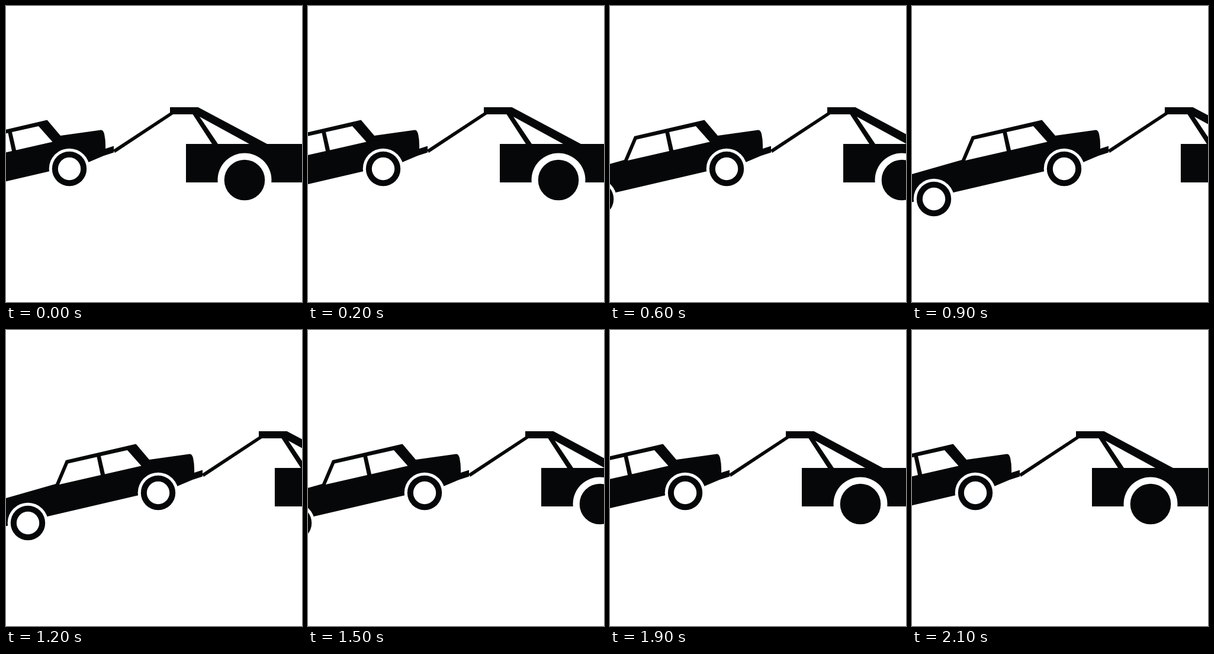
An HTML page for the animation above (2.2 s loop, 500 by 500 pixels).

```html
<!DOCTYPE html>
<html lang="en">
<head>
<meta charset="utf-8">
<title>Tow truck</title>
<style>
  html, body { margin: 0; width: 100%; height: 100%; overflow: hidden; background: #fff; }
  svg { display: block; width: 100vw; height: 100vh; }
  .ink { fill: #050708; }
  .gap { fill: #fff; }
</style>
</head>
<body>
<svg viewBox="0 0 500 500">
  <g id="scene">
    <g id="truck" class="ink">
      <path d="M304 233H520V298H304Z"/>
      <path d="M277 171H324.500L441 233H411L327 187L358 233H348L315.500 183H277Z"/>
      <path d="M277 180L283 182.500L184 248L181 243Z"/>
      <circle class="gap" cx="403" cy="294" r="45.500"/>
      <circle cx="403" cy="294" r="34.300"/>
    </g>
    <g id="car" class="ink" transform="translate(-150)">
      <path d="M-25 291L84 260L101 220L219.500 192.500L242 219L310 209.500Q314 208.500 316 216Q318.500 227 318 241L332 236.500V247.500L315 253L289 264L-25 337Z"/>
      <path class="gap" d="M90 261L105 225.500L153.500 214.500L160 245ZM160 213L205 203L228.500 229.500L167 243.500Z"/>
      <g id="wheel">
        <circle class="gap" cx="257" cy="275" r="34.300"/>
        <circle cx="257" cy="275" r="29.200"/>
        <circle class="gap" cx="257" cy="275" r="19.200"/>
      </g>
      <use href="#wheel" x="-220" y="51"/>
    </g>
  </g>
</svg>
<script>
  const STEP = 100, LAST = 10;
  const scene = document.getElementById("scene");

  // Slow start, a quick pull, then a steady pace.
  const shift = k => k <= 4 ? 10 * k : k <= 6 ? 40 + 25 * (k - 4) : 90 + 20 * (k - 6);

  function draw(now) {
    const n = Math.floor(now / STEP) % (2 * LAST + 2);
    // Out and back, holding two steps at each end.
    const k = Math.min(n, 2 * LAST + 1 - n);
    scene.setAttribute("transform", `translate(${shift(k)})`);
  }

  let start;
  function tick(now) {
    start ??= now;
    draw(now - start);
    requestAnimationFrame(tick);
  }
  draw(0);
  requestAnimationFrame(tick);
</script>
</body>
</html>
```
